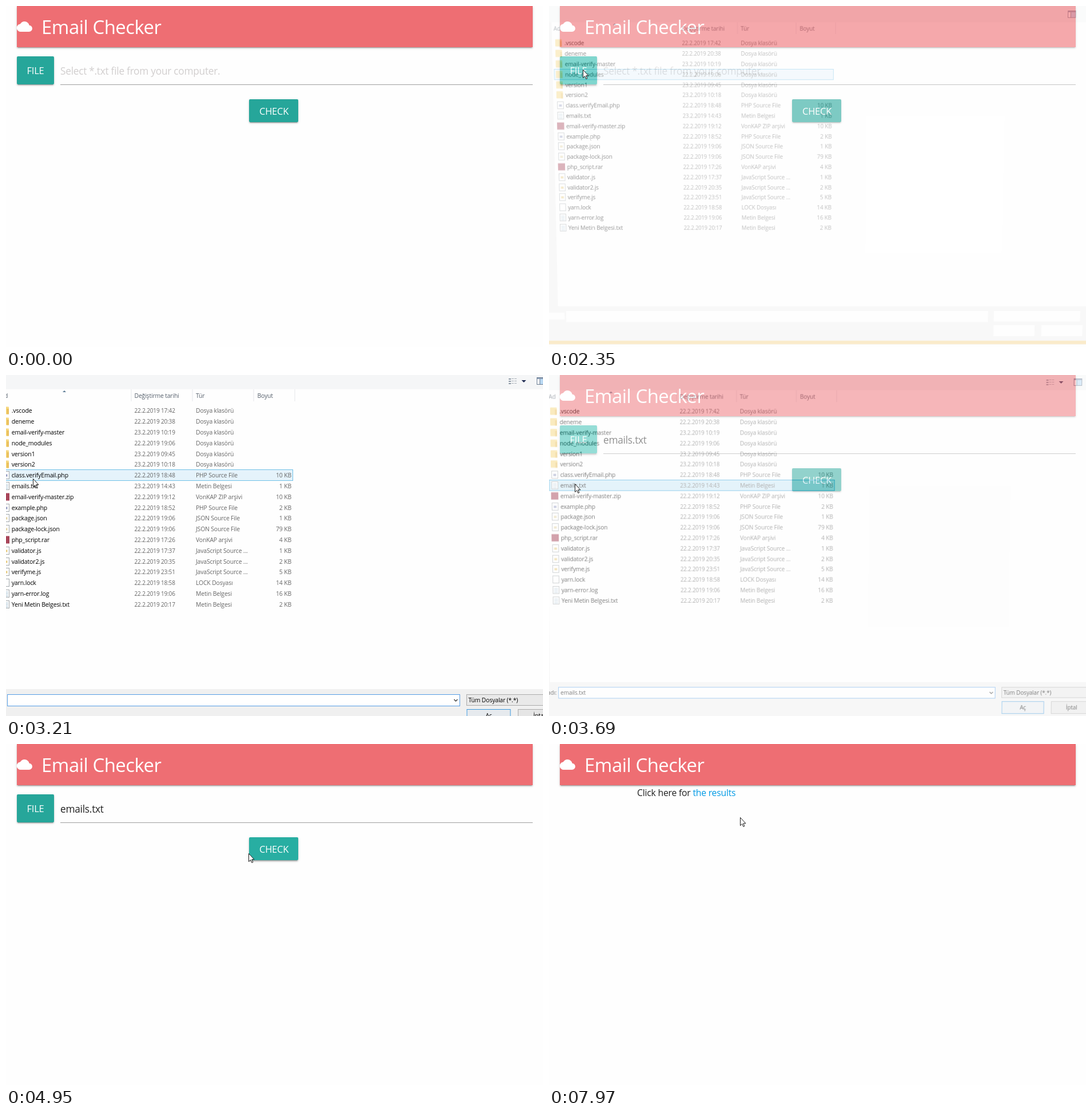
An HTML page that plays this animation: 939 by 596 pixels, repeating every 8000 ms.

```html
<!DOCTYPE html>
<html lang="en">
<head>
<meta charset="utf-8">
<title>Email Checker</title>
<style>
  html, body { margin: 0; width: 100%; height: 100%; overflow: hidden; background: #fefefe; }
  #stage { position: relative; width: 939px; height: 596px; overflow: hidden; }
  #stage div, svg { position: absolute; }
  svg { left: 0; top: 0; width: 939px; height: 596px; overflow: visible; }
  text { font-family: "Open Sans", "Noto Sans", sans-serif; letter-spacing: -.015em; white-space: pre; }
  .raised { box-shadow: 0 2px 2px rgba(0,0,0,.14), 0 1px 5px rgba(0,0,0,.12), 0 3px 1px -2px rgba(0,0,0,.2); }
  #nav { left: 19px; top: 0; width: 902px; height: 72px; background: #ee6e73; }
  #fileBtn { left: 19px; top: 88px; width: 65px; height: 49px; border-radius: 2px; }
  #checkBtn { left: 425px; top: 163px; width: 86px; height: 40px; border-radius: 2px; }
  #rule { left: 95px; top: 137px; width: 826px; height: 1px; background: #9e9e9e; }
  #dialog { transform-origin: 0 0; }
  #dialog text { font-size: 10.4px; }
  #dialog .name { font-size: 10.55px; }
  #dialog .date { font-size: 10px; }
</style>
</head>
<body>
<div id="stage">
  <div id="nav" class="raised"></div>
  <div id="form">
    <div id="fileBtn"></div>
    <div id="rule"></div>
    <div id="checkBtn"></div>
  </div>
  <svg id="labels">
    <path fill="#fff" transform="translate(18.8 22.4) scale(1.13)" d="M19.35 10.04C18.67 6.59 15.64 4 12 4 9.11 4 6.6 5.64 5.35 8.04 2.34 8.36 0 10.91 0 14c0 3.31 2.69 6 6 6h13c2.76 0 5-2.24 5-5 0-2.64-2.05-4.78-4.65-4.96z"/>
    <text x="62" y="49" font-size="32.9" fill="#fff">Email Checker</text>
    <g id="formText">
      <g font-size="16.5" fill="#fff" text-anchor="middle">
        <text x="51.5" y="118.5">FILE</text>
        <text x="468.5" y="190">CHECK</text>
      </g>
      <text id="field" x="95" y="120" font-size="17.3"></text>
    </g>
    <text id="result" x="154" y="91" font-size="15.8" fill="#222">Click here for <tspan fill="#039be5">the results</tspan></text>
  </svg>
  <svg id="dialog"></svg>
  <svg id="pointer">
    <path id="arrow" fill="#fff" stroke="#111" stroke-width=".95" d="M.5.5V14.6L3.7 11.6 5.9 16.5 7.9 15.6 5.8 10.8H10Z"/>
    <path id="hand" fill="#fff" stroke="#222" stroke-width="1.1" stroke-linejoin="round" d="M-1 13V2.2a1.7 1.7 0 0 1 3.4 0V8a1.6 1.6 0 0 1 2.9.2 1.5 1.5 0 0 1 2.6.4 1.4 1.4 0 0 1 2 1.3V14.5c0 2-1.2 3-1.4 5V21.3H.6V19.6C-.2 17.5-3 15.5-5 12.6c-.8-1.4.7-2.4 2-1.5zM2.4 8v3.4M5.3 8.4v3M7.9 9v2.6"/>
  </svg>
</div>
<script>
const LOOP = 8000, ROW_TOP = 62.4, ROW_STEP = 18.8;
const $ = id => document.getElementById(id);

const KINDS = {
  dir: 'Dosya klasörü', php: 'PHP Source File', txt: 'Metin Belgesi', zip: 'VonKAP ZIP arşivi',
  json: 'JSON Source File', rar: 'VonKAP arşivi', js: 'JavaScript Source ...', lock: 'LOCK Dosyası', log: 'Metin Belgesi'
};
const FILES = `.vscode|22.2.2019 17:42|dir
deneme|22.2.2019 20:38|dir
email-verify-master|23.2.2019 10:19|dir
node_modules|22.2.2019 19:06|dir
version1|23.2.2019 09:45|dir
version2|23.2.2019 10:18|dir
class.verifyEmail.php|22.2.2019 18:48|php|10
emails.txt|23.2.2019 14:43|txt|1
email-verify-master.zip|22.2.2019 19:12|zip|10
example.php|22.2.2019 18:52|php|2
package.json|22.2.2019 19:06|json|1
package-lock.json|22.2.2019 19:06|json|79
php_script.rar|22.2.2019 17:26|rar|4
validator.js|22.2.2019 17:37|js|1
validator2.js|22.2.2019 20:35|js|2
verifyme.js|22.2.2019 23:51|js|5
yarn.lock|22.2.2019 18:58|lock|14
yarn-error.log|22.2.2019 19:06|log|16
Yeni Metin Belgesi.txt|22.2.2019 20:17|txt|2`.split('\n').map(line => line.split('|'));

const rect = (x, y, w, h, fill, stroke = 'none', extra = '') =>
  `<rect x="${x}" y="${y}" width="${w}" height="${h}" fill="${fill}" stroke="${stroke}" ${extra}/>`;
const text = (x, y, value, fill = '#666', extra = '') =>
  `<text x="${x}" y="${y}" fill="${fill}" ${extra}>${value}</text>`;

function icon(kind, y) {
  if (kind === 'dir') return rect(-7, y - 6.5, 12, 13, '#f6d880', 'none', 'rx="1"') + rect(1.5, y - 3, 3.5, 9.5, '#e9bf5b');
  if (kind === 'zip' || kind === 'rar') return rect(-7, y - 6.5, 13, 13, '#a8455a');
  const page = rect(-5.5, y - 6.5, 11, 13, '#fff', '#a3a9ad');
  const tint = { php: '#9aa1c4', json: '#e3d5a8', js: '#e6cb82' }[kind];
  if (tint) return page + rect(-2.5, y - 1.5, 5, 4, tint);
  if (kind === 'lock') return page;
  return page + `<path d="M-3.5 ${y - 3}h7m-7 2.5h7m-7 2.5h7m-7 2.5h7" stroke="#a9c3d4"/>`;
}

function fileRow([name, date, kind, size], i) {
  const y = Math.round(ROW_TOP + ROW_STEP * i), base = y + 4;
  return icon(kind, y) + text(9.7, base, name, '#000', 'class="name"') + text(224.5, base, date, undefined, 'class="date"')
    + text(332, base, KINDS[kind]) + (size ? text(499, base, size + ' KB', undefined, 'text-anchor="end"') : '');
}

$('dialog').innerHTML =
  rect(-200, -60, 1240, 682, '#f0f0f0') + rect(-200, 614.7, 1240, 6.5, '#f5cf7c')
  + rect(-200, -60, 1240, 84.5, '#f5f6f7') + rect(-13, 24.5, 1050, 524.5, '#fefefe')
  + [219, 326, 433, 505].map(x => rect(x - .5, 25, 1, 21, '#e3e6ea')).join('')
  + '<path d="M99 30l3-3 3 3z" fill="#5e7d96"/>'
  + [['Ad', -9.5], ['Değiştirme tarihi', 224.5], ['Tür', 332], ['Boyut', 439.5]].map(([s, x]) => text(x, 40.2, s, '#56606c')).join('')
  + rect(-10, 0, 511.5, 19, '#e5f3fb', '#70c0e7', 'id="hover"')
  + FILES.map(fileRow).join('')
  + rect(928.5, 4.5, 14, 12, '#fff', '#6d7f94') + rect(929, 5, 13, 2, '#8a9db5') + rect(934, 7, 8, 9, '#b9d8f2') + rect(933, 7, 1, 9, '#6d7f94')
  + rect(-33, 561, 32, 13, '#fff') + rect(2, 558, 792, 21, '#fff') + rect(805, 558, 162, 20, '#fff')
  + rect(805, 585, 77, 21, '#fff') + rect(895, 585, 77, 21, '#fff')
  + '<g id="controls">'
  + [6, 10, 14].map(y => rect(879, y, 4, 2, '#8c98a5') + rect(884, y, 4, 1, '#a9b0b8') + rect(889, y, 4, 1, '#a9b0b8')).join('')
  + '<path d="M901.5 9h8l-4 4z" fill="#1d2a50"/>'
  + rect(-80, 560, 80, 15, '#f0f0f0') + text(-1, 571.8, 'Dosya adı:', '#000', 'text-anchor="end"')
  + rect(2.5, 558.5, 791, 20, '#fff', '#569de5')
  + '<path d="M783.5 567l3 3 3-3" fill="none" stroke="#444" stroke-width="1.5"/>'
  + rect(805.5, 558.5, 161, 19, '#e9e9e9', '#acacac') + text(808.5, 571.8, 'Tüm Dosyalar (*.*)', '#000')
  + rect(806, 584.5, 76, 22, '#e6eaee', '#3c97dc') + text(844, 599, 'Aç', '#000', 'text-anchor="middle"')
  + rect(895.5, 584.5, 76, 22, '#e5e5e5', '#acacac') + text(922, 599, 'İptal', '#000')
  + rect(7, 561, 1.3, 15, '#000', 'none', 'id="caret"') + text(6, 572, 'emails.txt', '#000', 'id="chosen"')
  + '</g>';

// Pointer path: [time, x, y], eased within each leg.
const PATH = [
  [400, 829, 590], [1240, 123, 185], [1270, 123, 185], [1990, 59, 111], [2580, 59, 111], [3130, 47, 181],
  [3230, 47, 181], [3310, 45, 190], [4250, 45, 190], [5100, 458, 187], [7360, 458, 187], [7970, 334, 128]
];
// Dialog states held until the next one: [time, opacity, tilt].
const DIALOG = [
  [0, 0, 1], [2350, .4, 1], [2440, .7, .42], [2500, .91, .14], [2580, 1, .03], [2650, 1, 0],
  [3590, .8, .2], [3660, .5, .5], [3730, .2, .8], [3800, 0, 1]
];

const clamp = v => Math.max(0, Math.min(1, v));
const ramp = (t, from, to) => clamp((t - from) / (to - from));
const show = (id, on) => { $(id).style.display = on ? '' : 'none'; };

function pointerAt(t) {
  const next = PATH.findIndex(p => p[0] > t);
  if (next < 1) return PATH[next ? PATH.length - 1 : 0].slice(1);
  const [t0, x0, y0] = PATH[next - 1], [t1, x1, y1] = PATH[next];
  const p = ramp(t, t0, t1), e = p * p * (3 - 2 * p);
  const sag = t0 === 4250 ? 16 * Math.sin(Math.PI * e) : 0;
  return [x0 + (x1 - x0) * e, y0 + (y1 - y0) * e + sag];
}

function paintButton(id, h) {
  const mix = (a, b) => Math.round(a + (b - a) * h);
  const style = $(id).style;
  style.background = `rgb(${mix(38, 43)},${mix(166, 187)},${mix(154, 173)})`;
  style.boxShadow = `0 ${2 + h}px ${2 + h}px rgba(0,0,0,.14), 0 1px ${5 + 2 * h}px rgba(0,0,0,.12), 0 3px 1px ${h - 2}px rgba(0,0,0,.2)`;
}

// Perspective tilt that makes the window recede toward its lower edge.
function tiltMatrix(e) {
  if (!e) return 'none';
  const cx = 410, s = 1 - .0397 * e, k = 5.5e-5 * e;
  return `matrix3d(${s},0,0,0, ${cx * k},${1 - .0228 * e},0,${k.toFixed(9)}, 0,0,1,0, ${cx * (1 - s)},${4.13 * e},0,1)`;
}

function drawDialog(t, y) {
  const [, opacity, tilt] = DIALOG.filter(d => d[0] <= t).pop();
  show('dialog', opacity > 0);
  $('dialog').style.opacity = opacity;
  $('dialog').style.transform = tiltMatrix(tilt);
  const picked = t >= 3400, row = Math.round((y - ROW_TOP) / ROW_STEP), hover = $('hover');
  hover.setAttribute('y', Math.round(ROW_TOP + ROW_STEP * row) - 9.5);
  hover.setAttribute('fill', picked ? '#cbe8f6' : '#e5f3fb');
  hover.setAttribute('stroke', picked ? '#26a0da' : '#70c0e7');
  show('controls', t >= 2440);
  show('caret', t < 2950);
  show('chosen', picked);
}

function draw(t) {
  const [x, y] = pointerAt(t);
  const done = t >= 6100, filled = t >= 3640, hand = t > 4320 && t < 7430 && x >= 425;
  show('form', !done);
  show('formText', !done);
  show('result', done);
  $('field').textContent = filled ? 'emails.txt' : 'Select *.txt file from your computer.';
  $('field').setAttribute('fill', filled ? '#222' : '#d1cece');
  paintButton('fileBtn', ramp(t, 1750, 1950) - ramp(t, 4260, 4500));
  paintButton('checkBtn', ramp(t, 4850, 5100));
  drawDialog(t, y);
  show('pointer', t >= 440);
  show('arrow', !hand);
  show('hand', hand);
  $('pointer').style.transform = `translate(${Math.round(x)}px,${Math.round(y)}px)`;
}

let start;
function tick(now) {
  start ??= now;
  draw((now - start) % LOOP);
  requestAnimationFrame(tick);
}
draw(0);
requestAnimationFrame(tick);
</script>
</body>
</html>
```
